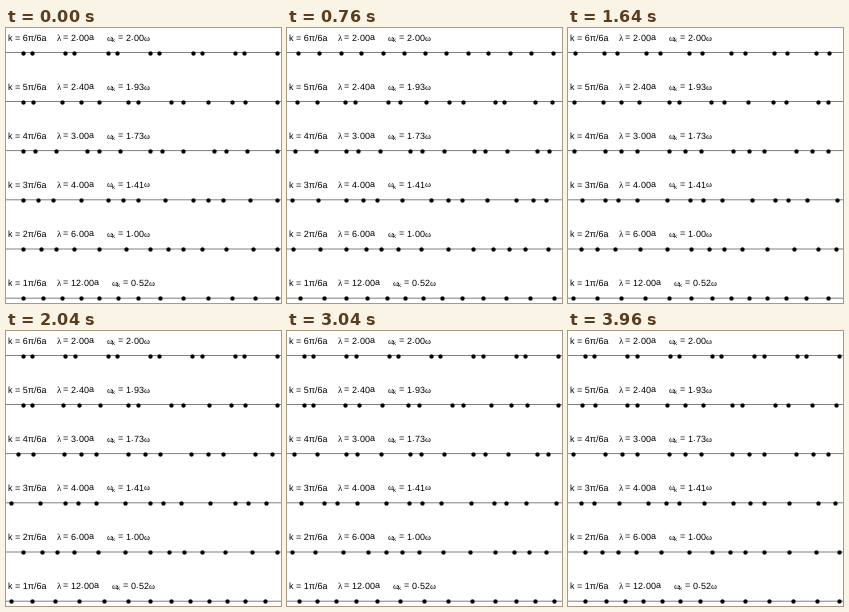
A matplotlib script that plays this animation: 275 px wide and 275 px high, repeating every 4 s.

```python
import numpy as np
import matplotlib.pyplot as plt
from matplotlib.animation import FuncAnimation

SIZE, DPI = 275, 100
PX = 72 / DPI                  # points per pixel
FRAMES, INTERVAL = 100, 40
CYCLES = 4                     # oscillations of the fastest mode per loop

ATOMS = np.arange(13)
REST = 10.9 + 21.2 * ATOMS     # equilibrium positions
AMPLITUDE = 6.1
MODES = [6, 5, 4, 3, 2, 1]     # k in units of pi/6a
FONT_SIZE = 9.2
DIGIT = 0.556 * FONT_SIZE      # width of one digit

plt.rcParams.update({
    "font.family": "Liberation Sans",
    "mathtext.fontset": "custom",
    "mathtext.rm": "Liberation Sans",
    "mathtext.it": "Liberation Serif",
    "text.hinting": "no_hinting",
    "text.hinting_factor": 1,
})

fig = plt.figure(figsize=(SIZE / DPI, SIZE / DPI), dpi=DPI, facecolor="white")
ax = fig.add_axes([0, 0, 1, 1])
ax.set_xlim(0, SIZE)
ax.set_ylim(SIZE, 0)
ax.axis("off")


def frequency(m):
    """Dispersion relation of the chain, in units of omega."""
    return 2 * np.sin(m * np.pi / 12)


def positions(m, frame):
    turn = 2 * np.pi * CYCLES * frame / FRAMES
    phase = m * np.pi / 6 * ATOMS - frequency(m) / 2 * turn
    return REST + AMPLITUDE * np.cos(phase)


def write(x, y, text):
    ax.text(x, y, text, fontsize=FONT_SIZE * PX, color="black",
            ha="left", va="baseline")


def add_labels(m, y):
    length = f"{12 / m:.2f}"
    write(2.4, y, f"k = {m}π/6a")
    write(50.4, y, rf"$\lambda$ = {length}a")
    write(99.6 + DIGIT * (len(length) - 4), y,
          rf"$\omega_{{\mathrm{{k}}}}$ = {frequency(m):.2f}$\omega$")


rows = []
for i, m in enumerate(MODES):
    y = 24.6 + 49.1 * i
    add_labels(m, 13 + 49 * i)
    ax.axhline(y, color="black", lw=0.5 * PX, snap=False, zorder=1)
    dots = ax.scatter(REST, np.full(len(ATOMS), y), s=(4.3 * PX) ** 2,
                      color="black", linewidths=0, zorder=2)
    rows.append((m, y, dots))


def update(frame):
    for m, y, dots in rows:
        x = positions(m, frame)
        dots.set_offsets(np.column_stack([x, np.full_like(x, y)]))
    return [dots for _, _, dots in rows]


anim = FuncAnimation(fig, update, frames=FRAMES, interval=INTERVAL,
                     repeat=True, repeat_delay=0, blit=False)
plt.show()
```
